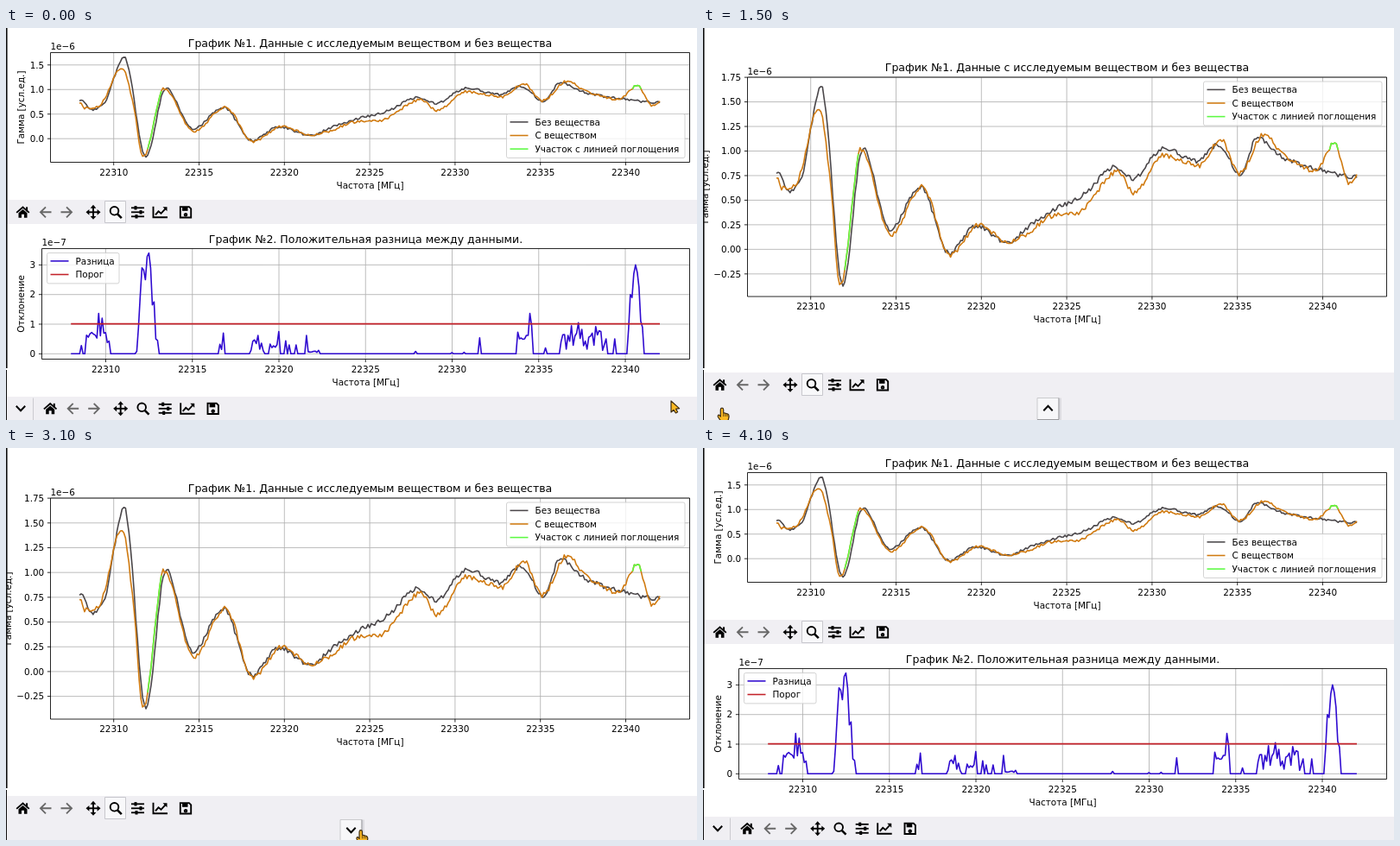
An HTML page with a canvas for the animation above (4500 ms loop, 800 by 454 pixels).

```html
<!DOCTYPE html>
<html lang="ru">
<head>
<meta charset="utf-8">
<style>
html, body { margin: 0; width: 100%; height: 100%; overflow: hidden; background: #fff; }
canvas { display: block; }
</style>
</head>
<body>
<canvas id="stage" width="800" height="454"></canvas>
<script>
const ctx = document.getElementById('stage').getContext('2d');
const GREY = '#4b474a', ORANGE = '#d07a10', GREEN = '#5cfa42', BLUE = '#2f0ad0', RED = '#c3222a';
const PANEL = '#f0eff3', SMALL = 10.42, LARGE = 12.5, SAMPLES = 341;

const noise = n => { const s = Math.sin(n * 127.1 + 3.7) * 43758.5453; return s - Math.floor(s) - 0.5; };

// Turning points: x in pixels, value in hundredths
const plain = smoothCurve([85,79, 101,60, 115,76, 137,165, 162,-37, 185,103, 216,20, 252,64, 285,-4, 316,24,
  353,7, 378,24, 406,40, 441,56, 478,84, 498,72, 533,103, 570,90, 597,107, 622,77, 642,114, 668,95, 705,83, 757,74], 0);
const sample = smoothCurve([85,72, 92,62, 110,70, 134,144, 147,73, 159,-37, 183,102, 217,15, 254,64, 286,-6, 320,25,
  352,8, 379,18, 400,33, 438,39, 480,79, 499,57, 532,96, 574,85, 599,112, 621,77, 649,117, 672,96, 709,80,
  731,108, 748,66, 757,74], 500);
const difference = differenceCurve();

// Hermite curve, level at every local extremum
function smoothCurve(knots, seed) {
  const n = knots.length / 2, X = i => knots[2 * i], V = i => knots[2 * i + 1];
  const slope = i => {
    if (i < 1 || i > n - 2 || (V(i) - V(i - 1)) * (V(i + 1) - V(i)) <= 0) return 0;
    return (V(i + 1) - V(i - 1)) / (X(i + 1) - X(i - 1));
  };
  let k = 0;
  return Array.from({ length: SAMPLES }, (_, i) => {
    const x = 85 + i * 672 / 340;
    while (k < n - 2 && x > X(k + 1)) k++;
    const h = X(k + 1) - X(k), u = (x - X(k)) / h, w = 1 - u;
    const v = V(k) * w * w * (1 + 2 * u) + V(k + 1) * u * u * (3 - 2 * u)
      + h * u * w * (slope(k) * w - slope(k + 1) * u);
    return [x, v / 100 + noise(i + seed) * 0.05];
  });
}

function differenceCurve() {
  const heights = new Array(SAMPLES).fill(0);
  // First and last sample, mean height, spread
  const clusters = [[9, 20, 60, .4], [21, 22, 42, .2], [104, 111, 25, 1.8], [115, 119, 28, .6],
    [137, 143, 8, 1], [258, 266, 75, .7], [283, 309, 48, 1.6]];
  for (const [from, to, mean, spread] of clusters)
    for (let i = from; i <= to; i++) heights[i] = mean * (1 + spread * noise(i));
  const spikes = { 6: 28, 16: 136, 18: 120, 86: 32, 87: 15, 88: 70, 108: 62, 120: 75, 124: 44, 126: 30, 130: 30,
    136: 62, 199: 8, 220: 4, 227: 5, 236: 54, 265: 136, 274: 20, 289: 95, 293: 105, 303: 92, 314: 50 };
  Object.assign(heights, spikes);
  const put = (start, ...values) => values.forEach((v, i) => heights[start + i] = v);
  put(38, 8, 90, 195, 290, 282, 250, 328, 340, 290, 165, 175, 50, 45);
  put(322, 85, 200, 190, 270, 300, 275, 225, 110, 90);
  return heights.map((h, i) => [75.2 + i * 2.005, h / 100]);
}

function text(str, x, y, align = 'left', size = SMALL) {
  ctx.font = `${size}px "DejaVu Sans", sans-serif`;
  ctx.textAlign = align;
  ctx.fillStyle = '#000';
  ctx.fillText(str, x, y);
}

function line(points, color, width) {
  ctx.beginPath();
  for (const p of points) ctx.lineTo(...p);
  ctx.strokeStyle = color;
  ctx.lineWidth = width;
  ctx.stroke();
}

function box(x, y, w, h, fill, stroke, radius = 0) {
  ctx.beginPath();
  ctx.roundRect(x, y, w, h, radius);
  ctx.fillStyle = fill;
  ctx.fill();
  ctx.strokeStyle = stroke;
  ctx.lineWidth = 0.85;
  ctx.stroke();
}

function at(x, y, paint, angle = 0) {
  ctx.save();
  ctx.translate(x, y);
  ctx.rotate(angle);
  paint();
  ctx.restore();
}

function legend(x, y, w, rows) {
  box(x, y, w, rows.length * 15.6 + 4.2, 'rgba(255,255,255,.8)', '#ccc', 2);
  rows.forEach(([label, color], i) => {
    const cy = y + 9.4 + i * 15.6;
    line([[x + 4, cy], [x + 25, cy]], color, 1.56);
    text(label, x + 33, cy + 3.7);
  });
}

function axes(a, drawData) {
  const { left, right, top, bottom } = a, middle = (left + right) / 2;
  const Y = v => bottom - (v - a.min) / (a.max - a.min) * (bottom - top);
  for (let i = 0; i < 7; i++) {
    const x = a.firstX + i * a.stepX;
    line([[x, top], [x, bottom]], '#b0b0b0', 0.83);
    line([[x, bottom], [x, bottom + 3.6]], '#000', 0.83);
    text(22310 + i * 5, x, bottom + 15, 'center');
  }
  for (let v = a.firstY; v <= a.max; v += a.stepY) {
    const y = Y(v);
    line([[left, y], [right, y]], '#b0b0b0', 0.83);
    line([[left - 3.6, y], [left, y]], '#000', 0.83);
    text(v.toFixed(a.digits).replace('-', '−'), left - 7.3, y + 3.8, 'right');
  }
  ctx.lineJoin = 'round';
  drawData((points, color) => line(points.map(([x, v]) => [x, Y(v)]), color, 1.6));
  ctx.lineJoin = 'miter';
  box(left, top, right - left, bottom - top, 'transparent', '#000');
  text(a.title, middle, top - 7, 'center', LARGE);
  text(a.scale, left, top - 3.2);
  text('Частота [МГц]', middle, bottom + 30, 'center');
  at(a.labelX, (top + bottom) / 2, () => text(a.label, 0, 0, 'center'), -Math.PI / 2);
}

function upperPlot(top, bottom, expanded) {
  axes({
    left: 51.5, right: 791.5, top, bottom, min: -0.48, max: 1.751, firstX: 124.7, stepX: 98.8,
    firstY: expanded ? -0.25 : 0, stepY: expanded ? 0.25 : 0.5, digits: expanded ? 2 : 1,
    title: 'График №1. Данные с исследуемым веществом и без вещества', scale: '1e−6',
    label: 'Гамма [усл.ед.]', labelX: expanded ? 5.5 : 21
  }, plot => {
    plot(plain, GREY);
    plot(sample, ORANGE);
    for (const [from, to] of [[163, 181], [724, 737]])
      plot(sample.filter(([x]) => x >= from && x <= to), GREEN);
  });
  legend(579.5, expanded ? top + 5 : bottom - 56, 206.5,
    [['Без вещества', GREY], ['С веществом', ORANGE], ['Участок с линией поглощения', GREEN]]);
}

function lowerPlot() {
  axes({
    left: 41.5, right: 791.5, top: 255.5, bottom: 383.5, min: -0.18, max: 3.55, firstX: 115.5, stepX: 100.25,
    firstY: 0, stepY: 1, digits: 0, title: 'График №2. Положительная разница между данными.',
    scale: '1e−7', label: 'Отклонение', labelX: 21
  }, plot => {
    plot(difference, BLUE);
    plot([[75.2, 1.01], [757, 1.01]], RED);
  });
  legend(47.5, 260.5, 83.5, [['Разница', BLUE], ['Порог', RED]]);
}

const stroke = d => ctx.stroke(new Path2D(d));
const fill = d => ctx.fill(new Path2D(d));

function ring(x, y, r) {
  ctx.beginPath();
  ctx.arc(x, y, r, 0, 2 * Math.PI);
  ctx.stroke();
}

function home() {
  stroke('M-7.3 .6L0-5.8 7.3 .6');
  fill('M-5 1L0-3.4 5 1V6.5H1.5V2.5H-1.5V6.5H-5Z');
  ctx.fillRect(3.6, -6, 2, 5);
}
function back() {
  ctx.strokeStyle = '#686868';
  stroke('M7 0H-5.5M.5-6L-5.5 0 .5 6');
}
function forward() {
  ctx.scale(-1, 1);
  back();
}
function move() {
  for (let i = 0; i < 4; i++) {
    stroke('M0 0V-6');
    fill('M0-8.5L3.4-4.6H-3.4Z');
    ctx.rotate(Math.PI / 2);
  }
}
function zoom() {
  ring(-1.5, -1.5, 4.8);
  ctx.lineWidth = 2.6;
  stroke('M2 2L6.8 6.8');
}
function sliders() {
  [-4, 2, -3].forEach((x, i) => {
    ctx.fillRect(-7.5, i * 5 - 5.9, 15, 1.8);
    ctx.fillRect(x, i * 5 - 7.2, 3, 4.4);
  });
}
function chart() {
  stroke('M-8-6.5V6H8.5M-5.5 3L-2-1 1 1.5 6-4');
  fill('M3-6H8V-1Z');
}
function save() {
  stroke('M-6.2-6.2H4L6.2-4V6.2H-6.2Z');
  ctx.fillRect(-4, -6, 6.5, 4.5);
  ring(0, 3, 1.3);
}

function toolbar(dx, y) {
  const places = [[home, 19.5], [back, 45.5], [forward, 70.5], [move, 101], [zoom, 127],
    [sliders, 152.5], [chart, 178.5], [save, 208]];
  for (const [icon, x] of places) at(x + dx, y, () => {
    ctx.strokeStyle = ctx.fillStyle = '#000';
    ctx.lineWidth = 1.9;
    icon();
  });
}

function toggle(x, y, up, framed) {
  if (framed) {
    box(x - 12.5, y - 12, 25, 25, '#f7f7f9', '#c4c4c8');
    line([[x + 12.5, y - 12], [x + 12.5, y + 13], [x - 12.5, y + 13]], '#99999d', 1);
  }
  line([[x + 14.5, y - 12], [x + 14.5, y + 14]], '#cbcbd0', 1);
  const d = up ? -2.7 : 2.7;
  line([[x - 5.2, y - d], [x, y + d], [x + 5.2, y - d]], '#000', 2);
}

const arrow = 'M0 0V13L3 10.3 5.4 14 7.6 12.8 5.6 9.2 9.6 8.6Z';
const hand = 'M-1.7 8V1Q-1.6-.8 0-.8 1.6-.8 1.7 1V4.6L6.8 6Q8.3 6.8 8 9.5L6.6 15.5H-.5L-4.6 9.5Q-5.2 7-3.4 7.2L-1.7 9Z';

// Time, tip x, tip y
const route = [[0, 770, 432], [500, 41, 410], [600, 40, 411], [1100, 22, 441], [1600, 22, 441],
  [2200, 431, 420], [2500, 397, 437], [2900, 397, 437], [3500, 450, 462]];

function pointerAt(t) {
  if (t >= 3500) return null;
  const i = route.findIndex(p => p[0] > t) - 1;
  const [t0, x0, y0] = route[i], [t1, x1, y1] = route[i + 1];
  const u = (t - t0) / (t1 - t0), e = u * u * (3 - 2 * u);
  return { x: x0 + (x1 - x0) * e, y: y0 + (y1 - y0) * e };
}

function drawPointer(over) {
  ctx.lineJoin = 'round';
  ctx.fillStyle = '#fbb924';
  ctx.strokeStyle = '#3d2c12';
  ctx.lineWidth = 1.2;
  fill(over ? hand : arrow);
  stroke(over ? hand : arrow);
  ctx.lineWidth = 0.8;
  if (over) stroke('M1.7 5V9M3.9 5.5V9M6 6V9');
}

function draw(t) {
  const expanded = t >= 1500 && t < 3700, settling = expanded && t < 1700;
  const pointer = pointerAt(t);
  const barY = expanded ? (settling ? 399 : 403) : 199;
  ctx.fillStyle = '#fff';
  ctx.fillRect(0, 0, 800, 454);
  ctx.fillStyle = PANEL;
  ctx.fillRect(0, barY, 800, expanded ? 60 : 28);
  if (!expanded) ctx.fillRect(0, 427, 800, 27);

  if (!expanded) upperPlot(28.5, 155.5, false);
  else if (settling) upperPlot(57, 311, true);
  else upperPlot(58, 314, true);

  box(114.5, barY + 1.5, 24, 25, '#f8f8fa', '#c0c0c6');
  toolbar(0, barY + 14.3);

  let over;
  if (expanded) {
    over = settling || pointer && Math.abs(pointer.x - 400) < 13 && pointer.y > 430;
    toggle(399.5, settling ? 440.5 : 442.5, t < 3000, true);
  } else {
    lowerPlot();
    over = pointer && pointer.x < 30 && pointer.y > 428;
    toggle(17, 440.5, t >= 1000 && t < 1500, over);
    toolbar(31.7, 440.8);
  }

  ctx.fillStyle = '#111';
  ctx.fillRect(0, 0, 1.6, 394);
  ctx.fillRect(0, 396, 1, 58);
  if (pointer) at(pointer.x, pointer.y, () => drawPointer(over));
}

let shown = -1;
const begin = performance.now();
function tick() {
  const t = Math.floor((performance.now() - begin) % 4500 / 100) * 100;
  if (t !== shown) draw(shown = t);
  requestAnimationFrame(tick);
}
tick();
</script>
</body>
</html>
```
